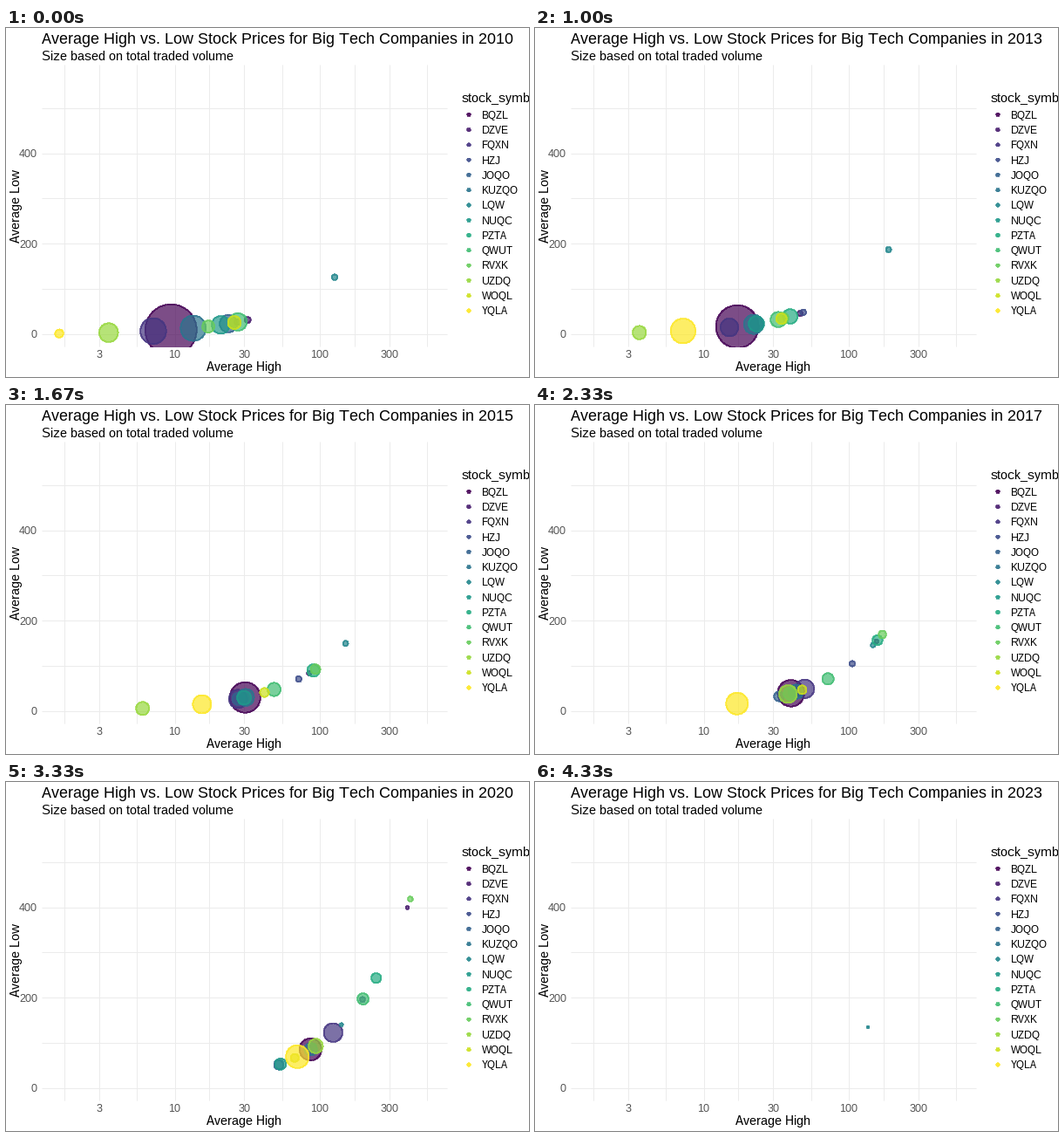
Animation, 600 px wide and 400 px high, one loop 4.67 s. Source, as a matplotlib script:

```python
import numpy as np
import matplotlib.pyplot as plt
from matplotlib.animation import FuncAnimation
from matplotlib.patches import Rectangle

# Whole-pixel letter advances, no kerning
plt.rcParams.update({
    "font.family": "Liberation Sans",
    "text.hinting": "default",
    "text.hinting_factor": 1,
    "text.kerning_factor": 6,
})

W, H = 600, 400
DPI = 80
PX = 72 / DPI  # points per pixel
LOOP_MS, TICK_MS = 4670, 10
FIRST, LAST = 10, 22  # years after 2000
LEFT, RIGHT, TOP, BOTTOM = 41, 506, 42, 365
GREY = "#4d4d4d"

# Key points: (year, price, bubble radius)
STOCKS = {
    "BQZL": [(10, 9.4, 30), (13, 17, 25), (15, 30.5, 18), (19, 52, 13.5),
             (21, 142, 12.8)],
    "DZVE": [(10, 31.7, 4), (13, 46, 3.5), (19, 283, 2.4), (21, 564, 2.3)],
    "FQXN": [(10, 7.1, 15.3), (13, 15, 10.7), (19, 90, 11.5), (21, 168, 11)],
    "HZJ": [(10, 27, 4), (19, 155, 3.5), (21, 248, 3.3)],
    "JOQO": [(10, 23.4, 10.5), (13, 22.8, 9), (17, 33, 6.2), (19, 52, 6)],
    "KUZQO": [(10, 13.4, 15), (13, 22, 11.5), (19, 60, 7.4), (21, 124, 8)],
    "LQW": [(10, 126, 3.7), (13, 187, 3.5), (15, 150, 3.4), (23, 135, 1.6)],
    "NUQC": [(10, 20.7, 10.7), (13, 23, 9.3), (19, 51, 6.6), (21, 56, 7.2)],
    "PZTA": [(12, 26, 9.5), (15, 90, 7.6), (17, 157, 6.2), (19, 183, 6.2),
             (21, 324, 6.2)],
    "QWUT": [(10, 27.3, 10.5), (13, 32.5, 9.2), (17, 71.6, 7), (21, 277, 7)],
    "RVXK": [(10, 17, 7.5), (13, 35, 7), (15, 93, 6), (21, 565, 2.8)],
    "UZDQ": [(10, 3.5, 11.3), (13, 3.6, 8.2), (15, 6, 8), (17, 38, 10.7),
             (19, 44, 9), (21, 198, 8.5)],
    "WOQL": [(10, 25.7, 8), (15, 41.4, 5.6), (19, 54.7, 5.3), (21, 82, 4.9)],
    "YQLA": [(10, 1.6, 5.2), (12, 2.1, 6.2), (13, 7.2, 14.7), (15, 15.4, 11),
             (19, 18.6, 15), (21, 262, 12.3)],
}

fig = plt.figure(figsize=(W / DPI, H / DPI), dpi=DPI, facecolor="white")
ax = fig.add_axes([0, 0, 1, 1])
ax.axis("off")


def x_of(price):
    return 193.7 + 166.6 * (np.log10(price) - 1)


def y_of(price):
    return 351 - 0.5185 * price


def label(x, y, s, size, color="black", **kw):
    return ax.text(x, y, s, fontsize=size * PX, color=color, **kw)


def area(radius):
    """Marker area for an outer radius in pixels, border included."""
    return (2 * (radius - 0.5) * PX) ** 2


def dots(x, y, radius, **kw):
    colors = plt.get_cmap("viridis")(np.linspace(0, 1, len(STOCKS)))
    return ax.scatter(x, y, s=area(radius), c=colors, alpha=0.7,
                      linewidths=0.95 * PX, antialiased=False, **kw)


# Grid and tick labels
grid = dict(color="#ebebeb", lw=PX, zorder=0, solid_capstyle="butt")
x_ticks = [3, 10, 30, 100, 300]
x_edges = [1, *x_ticks, 1000]
x_minor = [np.sqrt(a * b) for a, b in zip(x_edges, x_edges[1:])]
for v in x_ticks + x_minor:
    ax.plot([x_of(v)] * 2, [TOP, BOTTOM], **grid)
for v in range(0, 501, 100):
    ax.plot([LEFT, RIGHT], [y_of(v)] * 2, **grid)
for v in x_ticks:
    label(x_of(v), 378, str(v), 12, GREY, ha="center")
for v in (0, 200, 400):
    label(36, y_of(v) + 4.3, str(v), 12, GREY, ha="right")

# Titles
title = label(41, 18, "", 18)
label(41, 37, "Size based on total traded volume", 15)
label(273.5, 393, "Average High", 15, ha="center")
label(19.5, 203.7, "Average Low", 15, rotation=90, ha="right", va="center")

# Legend
rows = 99.3 + 17.28 * np.arange(len(STOCKS))
label(523, 85, "stock_symbol", 15)
dots(np.full(len(rows), 531), rows, 2.1)
for y, name in zip(rows, STOCKS):
    label(545.5, y + 4.4, name, 12)

bubbles = dots(np.zeros(len(rows)), rows, np.ones(len(rows)), zorder=3)
bubbles.set_clip_path(Rectangle((LEFT, TOP), RIGHT - LEFT,
                                BOTTOM + 0.5 - TOP, transform=ax.transData))
ax.set_xlim(0, W)
ax.set_ylim(H, 0)


def bubble(keys, year):
    """Centre and radius; prices grow geometrically between key points."""
    years, prices, radii = np.array(keys).T
    if not years[0] <= year <= max(LAST, years[-1]):
        return -W, 0, 1
    price = np.exp(np.interp(year, years, np.log(prices)))
    return x_of(price), y_of(price), np.interp(year, years, radii)


def update(n):
    # Three years a second, on the nearest tick
    year = FIRST + int((n + 0.5) * TICK_MS * 3 / 1000)
    title.set_text("Average High vs. Low Stock Prices for "
                   f"Big Tech Companies in {2000 + year}")
    x, y, r = np.array([bubble(k, year) for k in STOCKS.values()]).T
    bubbles.set_offsets(np.column_stack([x, y]))
    bubbles.set_sizes(area(r))
    return title, bubbles


anim = FuncAnimation(fig, update, frames=LOOP_MS // TICK_MS, interval=TICK_MS,
                     repeat=True, repeat_delay=0, blit=False)
plt.show()
```
